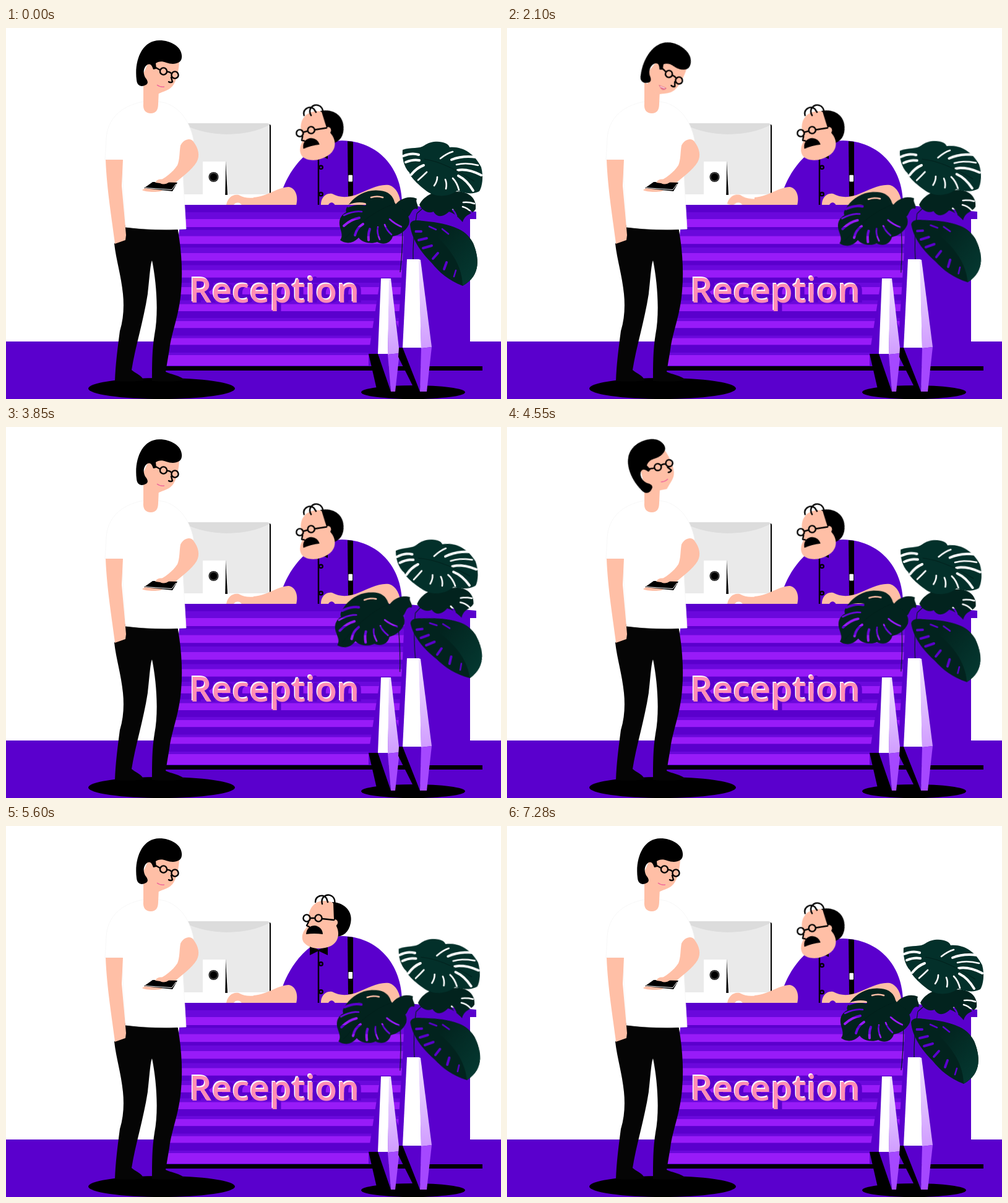
An HTML page for the animation above (7.35 s loop, 800x600 px).

```html
<!DOCTYPE html>
<html lang="en">
<head>
<meta charset="utf-8">
<title>Reception</title>
<style>
html, body { margin: 0; width: 100%; height: 100%; overflow: hidden; background: #fff; }
svg { display: block; width: 100vw; height: 100vh; }
:root { --violet: #5a00cd; --skin: #ffbfa6; --leaf: #03302a; }

.violet { fill: var(--violet); }
.skin { fill: var(--skin); }
.leaf { fill: var(--leaf); }
.shade { fill: #02231e; }
.ink { fill: none; stroke: #000; stroke-width: 2.4; stroke-linecap: round; stroke-linejoin: round; }
.vein { fill: none; stroke: #02201c; stroke-width: 1.2; }
.slit { fill: none; stroke: #000; stroke-width: 4; stroke-linecap: round; }
.thin { stroke-width: 2.6; }
.sign { font: 600 57px "Open Sans", "Noto Sans", sans-serif; }

.visitor, .open, .closed, .clerk, .flip, .torso, .hand, .sway {
  animation: 7350ms cubic-bezier(.4, 0, .6, 1) infinite;
}
.visitor { transform-origin: 240px 88px; animation-name: visitor; }
.open { animation-name: open; animation-timing-function: step-end; }
.closed { animation-name: closed; animation-timing-function: step-end; }
.clerk { transform-origin: 518px 160px; animation-name: clerk; }
.flip { transform-origin: 518px 160px; animation-name: flip; animation-timing-function: step-end; }
.torso { transform-origin: 505px 286px; animation-name: torso; }
.hand { transform-origin: 405px 280px; animation-name: hand; }
.sway { animation-name: sway; animation-timing-function: cubic-bezier(.37, 0, .63, 1); }
.top { transform-origin: 672px 330px; --tilt: -5deg; }
.left { transform-origin: 650px 400px; --tilt: -5.2deg; }
.right { transform-origin: 652px 312px; --tilt: -7deg; }

/* visitor: reading, talking, looking up */
@keyframes visitor {
  0%, 4.8%, 50.3%, 54.4%, 71.4%, 100% { transform: none; }
  10.5%, 43.5% { transform: translate(3px, 0) rotate(15deg); }
  59.9%, 65.3% { transform: translate(3px, 0) rotate(-37deg); }
}
@keyframes open { 0%, 46.7%, 100% { opacity: 0; } 7.6% { opacity: 1; } }
@keyframes closed { 0%, 46.7%, 100% { opacity: 1; } 7.6% { opacity: 0; } }

/* clerk: typing, leaning in, sitting up */
@keyframes clerk {
  0%, 33.3%, 51%, 66.7%, 97.1%, 100% { transform: translate(-9.4px, 12.4px) rotate(-15deg); }
  39.5%, 44.5% { transform: translate(-26px, 27px) rotate(-19deg); }
  73.5%, 91.4% { transform: none; }
}
@keyframes torso {
  0%, 33.3%, 51%, 66.7%, 97.1%, 100% { transform: scaleY(.963); }
  39.5%, 44.5% { transform: scaleY(.88); }
  73.5%, 91.4% { transform: none; }
}
@keyframes flip { 0%, 89.5%, 100% { transform: none; } 80% { transform: scaleX(-1); } }
@keyframes hand {
  0%, 9.5%, 21%, 32.4%, 100% { transform: none; }
  15.2%, 26.7% { transform: translateY(3px) rotate(6deg); }
}
@keyframes sway {
  0%, 37.4%, 68%, 99%, 100% { transform: none; }
  20.4%, 54.4%, 83.4% { transform: rotate(var(--tilt)); }
}
</style>
</head>
<body>
<svg viewBox="0 0 800 600" preserveAspectRatio="none">
  <defs>
    <linearGradient id="glass" x1="0" y1="0" x2="0" y2="1">
      <stop offset="0" stop-color="#f0e2ff"/><stop offset="1" stop-color="#d09cff"/>
    </linearGradient>
    <linearGradient id="blade" x1="0" y1="0" x2="1" y2="1">
      <stop offset=".3" stop-color="#02231e"/><stop offset="1" stop-color="#053b33"/>
    </linearGradient>
    <clipPath id="front"><path d="M284 286H645L641 376L630 546H259Z"/></clipPath>
    <mask id="topCuts">
      <path fill="#fff" d="M630 170H790V330H630Z"/>
      <path class="slit" d="M642 207Q656 201 667 205M646 217Q658 212 668 214M655 237Q664 226 675 222M760 209Q738 206 720 213M768 238Q746 227 730 230M755 263Q745 246 731 239"/>
      <path class="slit thin" d="M763 222Q744 217 728 221M732 262Q729 250 722 243M702 211Q712 203 722 200M711 260Q713 252 710 245M692 255Q697 248 697 241M666 246Q674 239 680 233"/>
    </mask>
    <mask id="lowCuts">
      <path fill="#fff" d="M650 240H790V330H650Z"/>
      <path class="slit thin" d="M757 284Q748 281 739 282M752 298Q746 291 738 289M728 304Q726 298 722 294"/>
    </mask>
    <mask id="leftCuts">
      <path fill="#fff" d="M520 250H680V370H520Z"/>
      <path class="slit" d="M553 288Q568 282 580 285M546 320Q558 309 571 307M564 335Q567 323 577 317M586 343Q585 333 588 325"/>
      <path class="slit thin" d="M546 303Q562 295 575 297M604 342Q599 331 601 322M623 334Q615 327 612 318M640 322Q627 316 620 309M590 274Q600 271 609 274"/>
    </mask>
    <mask id="rightCuts">
      <path fill="#fff" d="M640 300H780V430H640Z"/>
      <path class="slit" d="M662 329L671 329M667 343L680 340M674 356L688 352M690 373L698 364M708 390L712 379"/>
      <path class="slit thin" d="M684 321L695 326M705 325L715 333M724 402L727 392"/>
    </mask>
    <path id="hair" d="M211 84C207 54 219 20 248 20C268 20 286 32 284 48C283 58 270 60 259 56C252 53 246 54 242 57L243 66L238 67C236 60 233 57 229 59C222 63 221 73 225 80C230 86 230 90 226 92C219 96 212 94 211 84Z"/>
  </defs>

  <path fill="#fff" d="M0 0H800V600H0Z"/>
  <path class="violet" d="M0 507H800V600H0Z"/>

  <!-- monitor -->
  <path fill="#000" d="M420 156H426Q428 156 428 159V269H420Z"/>
  <path fill="#eaeaea" d="M286 154H422Q426 154 426 158V269H286Z"/>
  <path fill="#dcdcdc" d="M289 154H422Q425 154 425 157Q400 171 357 172Q318 171 289 157Z"/>
  <path fill="#000" d="M355 215L358 270H354Z"/>
  <path fill="#fff" d="M318 216H355L354 286H318Z"/>
  <circle cx="335.500" cy="241" r="8"/>
  <circle cx="335.500" cy="241" r="6.600" fill="none" stroke="#aaa" stroke-width=".7"/>

  <!-- clerk -->
  <g class="torso">
    <path class="violet" d="M447 260C458 228 490 178 543 178C600 179 640 222 640 286H455Z"/>
    <path d="M552 179L561 180V272H553Z"/>
    <rect x="553.500" y="236" width="6.500" height="11" rx="1" fill="#fff"/>
    <path class="ink" stroke-width="2" d="M505 203V286"/>
    <g class="ink"><circle cx="509" cy="223" r="2.800"/><circle cx="509" cy="268" r="2.800"/></g>
    <path d="M491 193L505 200L520 194V209L505 202L491 209Z"/>
  </g>
  <g class="clerk"><g class="flip">
    <path d="M527 123C549 124 561 140 557 157C554 172 545 179 532 179Z"/>
    <path class="skin" d="M489 149C489 132 500 121 513 121C520 121 526 122 529 125L530 152C533 150 537 153 536 157C536 160 533 160 534 162C540 174 537 188 525 194C510 201 490 199 481 188C476 180 480 170 486 164Z"/>
    <g class="ink">
      <circle cx="486" cy="149" r="5.600"/><circle cx="505" cy="149" r="5.600"/>
      <path d="M492 149H499M511 150L530 152M489 155L486 161L490 163"/>
      <path d="M500 123C500 113 512 109 518 117L520 123M511 126C508 114 519 109 526 113C531 116 532 121 531 126"/>
    </g>
    <path d="M485 175C486 165 492 161 499 161C507 162 512 168 512 175Q498 173 485 175Z"/>
  </g></g>
  <path class="skin" d="M400 274C424 272 440 257 457 257C468 259 473 272 469 287H400Z"/>
  <path class="skin hand" d="M356 286C358 275 366 268 376 270C386 276 395 275 407 274V288H382C379 282 373 281 369 285L365 288Z"/>
  <path class="skin" d="M509 287C508 275 517 266 527 268C540 275 552 274 565 270C585 262 602 252 619 254C631 258 637 270 638 287H532C529 281 524 281 521 286Z"/>

  <!-- desk -->
  <path class="violet" d="M284 286H640L760 297V309H750V547H259Z"/>
  <g clip-path="url(#front)" id="stripes"></g>
  <path class="violet" d="M605 405L586 527V547H640L636 490Z"/>
  <path d="M257 547H770V554H257Z"/>
  <g class="sign">
    <text x="303" y="444" class="violet">Reception</text>
    <text x="294.500" y="442" fill="#fff">Reception</text>
    <text x="296" y="443.500" fill="#ff8db5">Reception</text>
  </g>

  <!-- plant -->
  <ellipse cx="658" cy="589" rx="84" ry="11"/>
  <g class="sway top">
    <path class="vein" d="M664 300Q657 340 658 378M664 300Q676 290 690 275"/>
    <path class="shade" mask="url(#lowCuts)" d="M668 286C675 270 700 258 725 265C745 262 762 275 759 293C753 302 742 300 738 314C731 306 725 300 716 297C705 307 696 306 691 297C681 301 672 294 668 286Z"/>
    <path class="leaf" mask="url(#topCuts)" d="M641 197C655 192 668 196 676 190C690 180 714 183 717 193C738 191 757 203 768 225C772 240 770 256 765 264C754 270 740 267 729 263C717 273 695 275 680 264C671 257 655 244 652 234C642 224 640 208 641 197Z"/>
    <path class="vein" d="M676 212Q710 217 757 248"/>
  </g>
  <g class="sway left">
    <path class="vein" d="M638 293Q644 330 637 395"/>
    <path class="shade" d="M626 291C633 277 650 270 664 276C661 282 668 287 665 293C656 289 655 302 650 305C642 297 632 305 626 291Z"/>
    <path class="shade" mask="url(#leftCuts)" d="M556 283C566 270 585 260 605 263C618 264 626 272 628 282L632 288C645 295 655 305 651 318C645 330 635 335 625 337C622 348 610 352 600 346C590 350 575 347 570 339C560 350 548 349 540 343C546 335 540 327 539 318C538 308 543 301 550 298C548 292 552 288 556 283Z"/>
    <path class="vein" d="M627 285Q590 296 548 340"/>
  </g>
  <g class="sway right" mask="url(#rightCuts)">
    <path class="shade" d="M653 318C655 308 668 311 690 316C725 318 745 328 755 348C764 370 769 400 738 417C715 408 700 395 688 380C670 362 655 340 653 318Z"/>
    <path fill="url(#blade)" d="M660 311C690 313 738 316 755 348C764 370 769 400 738 417C738 380 710 340 660 311Z"/>
  </g>

  <!-- vases -->
  <path d="M586 527H603L623 588H600Z"/>
  <path fill="#fff" d="M606 405H620L617 527H601Z"/>
  <path fill="url(#glass)" d="M619 405H622L636 526L617 528Z"/>
  <path class="violet" d="M601 527H617L622 588Z"/>
  <path fill="#a548ff" d="M617 528L636 526L629 588H622Z"/>
  <path d="M635 517H643L670 588H662L634 532Z"/>
  <path fill="#fff" d="M648 374H668L671 517H641Z"/>
  <path fill="url(#glass)" d="M667 374L670 375L688 516L671 518Z"/>
  <path class="violet" d="M641 517H671L669 588Z"/>
  <path fill="#a548ff" d="M671 518L688 516L680 588H669Z"/>

  <!-- visitor -->
  <ellipse cx="251.500" cy="583" rx="118.500" ry="17"/>
  <path fill="#050505" d="M193 318L277 322C283 355 286 390 283 425C280 465 268 490 264 520L258 556C266 560 284 563 288 569Q278 573 236 571C236 545 236 520 240 496C247 460 243 410 236 376C233 382 232 405 229 430C222 475 209 515 203 553C208 558 221 562 222 570Q205 573 176 571C177 545 180 520 184 490C190 470 191 450 189 430C186 400 178 375 175 349Z"/>
  <path fill="#fff" stroke="#f5f5f5" stroke-width=".8" d="M222 119C185 126 163 148 162 180L160 213H187L193 322Q240 328 291 325L286 240L303 181C296 146 276 122 246 119Z"/>
  <path class="skin" d="M161 213H189L187 255L191 300L194 335L193 343L176 349C173 320 163 265 161 213Z"/>
  <path class="skin" d="M222 88L247 100L246 122C246 133 242 138 234 138C226 138 221 133 222 122Z"/>
  <path class="skin" d="M282 190C287 179 299 177 303 184C311 194 314 207 308 217C301 229 284 241 272 252L250 264C240 266 224 265 220 262L243 249C256 244 270 233 277 222C281 212 280 201 282 190Z"/>
  <path d="M237 249L277 250L269 264L223 259Z"/>
  <path fill="none" stroke="#fff" stroke-width="1" d="M225 258.500L268 261.500L275 252"/>
  <path class="skin" d="M241 250Q245 243 255 245L264 249Q256 255 249 251Z"/>
  <g class="visitor">
    <path class="skin" d="M229 58L240 52L280 54C279 72 275 90 266 97C260 102 250 104 245 107L226 98L222 74Z"/>
    <use href="#hair"/>
    <g class="ink" stroke-width="2">
      <circle cx="254.500" cy="70" r="5.600"/><circle cx="273" cy="76" r="5.600"/>
      <path d="M242 64L249 68M260 71Q264 70 268 74M267 80L269 87Q266 89 263 87"/>
    </g>
    <path class="closed" fill="none" stroke="#f0679c" stroke-width="1.600" d="M244 92Q249 96 256 95"/>
    <g class="open">
      <path fill="#e5748a" d="M243 91L257 93Q252 103 243 91Z"/>
      <path fill="none" stroke="#fff" stroke-width="1" d="M246 93L254 94"/>
    </g>
  </g>
</svg>
<script>
const stripes = document.getElementById("stripes");
const band = (y, h, fill) =>
  `<rect x="250" y="${y}" width="400" height="${h}" fill="${fill}"/>`;
for (let i = 0; i < 9; i++) {
  const y = 309 + i * 27.5;
  const h = i < 8 ? 13 - i * 0.3 : 18;
  const lip = Math.max(4, 11 - i);
  stripes.innerHTML += band(y - lip, lip, "#6a08dc") + band(y, h, "#981bf8");
}
</script>
</body>
</html>
```
